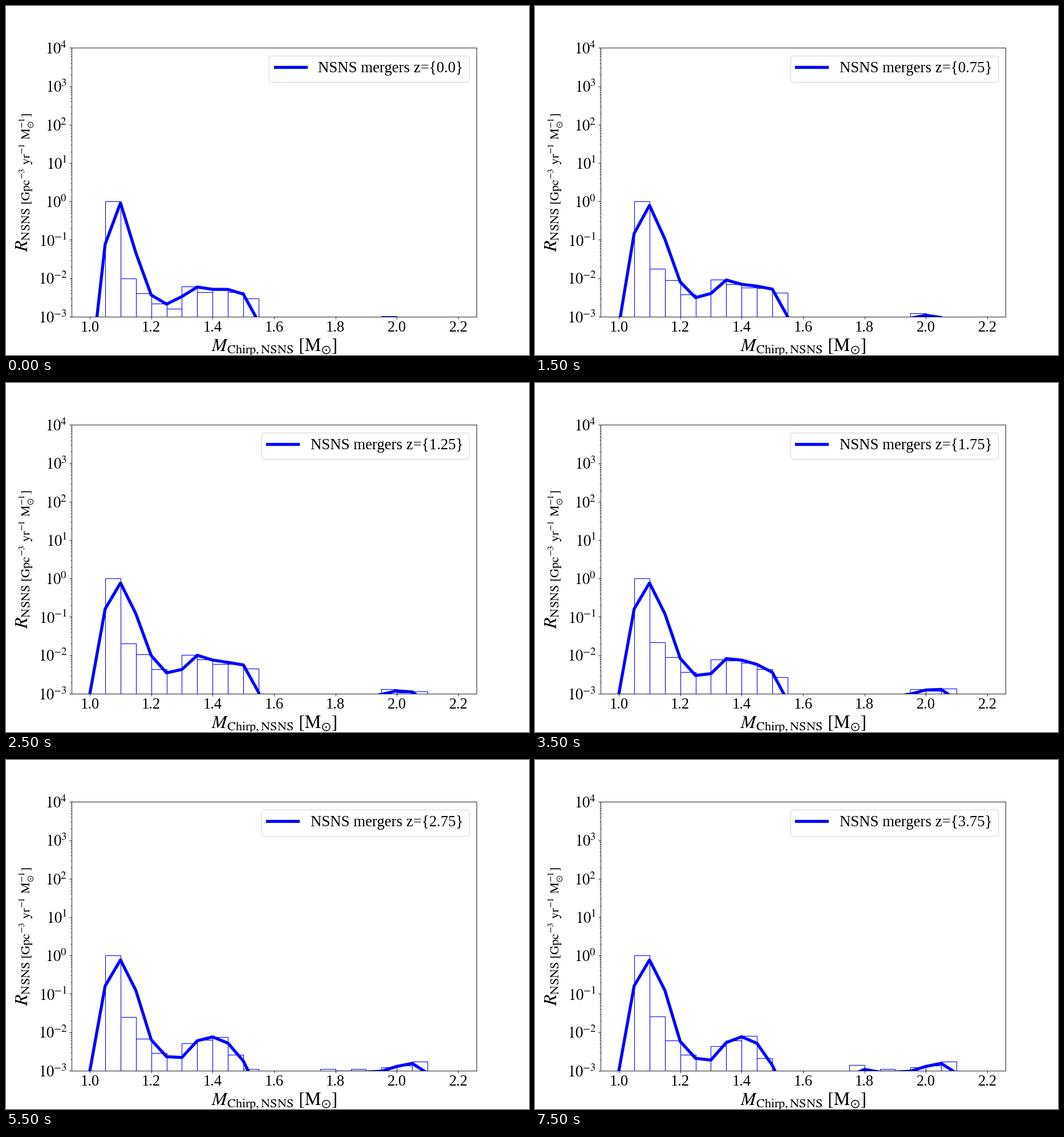
A matplotlib script for the animation above (8000 ms loop, 917 by 611 pixels).

```python
import numpy as np
import matplotlib.pyplot as plt
from matplotlib.animation import FuncAnimation
from matplotlib.ticker import FuncFormatter, LogLocator, MultipleLocator, NullFormatter

W, H, DPI = 917, 611, 64
PT = W / 12 / DPI          # sizes below are for a 12 inch wide figure
FRAMES, STEP = 16, 0.25
Z_MID, Z_END = 1.25, 3.75

plt.rcParams.update({
    "font.family": "Liberation Serif",
    "mathtext.fontset": "stix",
    "font.size": 25 * PT,
    "axes.linewidth": 0.8 * PT,
    "axes.labelpad": 4 * PT,
    "patch.linewidth": 1.0 * PT,
})
for axis in ("xtick", "ytick"):
    plt.rcParams.update({
        f"{axis}.major.size": 3.5 * PT, f"{axis}.major.width": 0.8 * PT,
        f"{axis}.minor.size": 2 * PT, f"{axis}.minor.width": 0.6 * PT,
        f"{axis}.major.pad": 3.5 * PT,
    })

BIN = 0.05
NODES = 1.0 + BIN * np.arange(23)
EDGES = NODES[1:-1]

# Rates are in units of 1e-3; light bins at redshift 0, Z_MID and Z_END
LIGHT = np.log([
    [10, 4.0, 2.2, 1.6, 6.2, 4.4, 5.0, 4.3, 3.0],
    [20, 10.7, 4.3, 0.9, 10.2, 7.8, 5.8, 5.9, 4.5],
    [26, 6.1, 2.6, 0.5, 4.3, 6.0, 8.0, 2.1, 0.8],
])

# Share of each bin that goes to the node on its right
SHARE = np.where(EDGES < 1.6, 0.78 - 3.4 * (EDGES - 1.1) ** 2, 0.5)


def ease_out(t):
    return np.sin(np.pi / 2 * np.clip(t, 0, 1))


def light(z):
    k = int(z >= Z_MID)
    t = (z - Z_MID) / (Z_END - Z_MID) if k else z / Z_MID
    return np.exp(LIGHT[k] + (LIGHT[k + 1] - LIGHT[k]) * ease_out(t))


def heavy(z):
    """Rippled plateau with a broad bump that grows and drifts right."""
    grow = min(z / 2.5, 1)
    x = EDGES[-7:] + BIN / 2
    ripple = 1 + 0.2 * (-1.0) ** np.arange(7)
    bump = np.exp(-((x - 1.99 - 0.055 * grow) / 0.06) ** 4)
    rate = (0.65 + 0.265 * grow) * ripple + (0.25 + 0.4 * grow) * bump
    rate[0] = 0.22 + 0.32 * z
    return rate


def histogram(z):
    return np.concatenate([[1000], light(z), np.full(4, 0.01), heavy(z)])


def curve(z):
    """Gaussian main peak plus the other bins shared between their edges."""
    e = ease_out(z / Z_MID)
    sigma = 0.021 + 0.0055 * e
    y = (920 - 155 * e) * np.exp(-0.5 * ((NODES - 1.0968) / sigma) ** 2)
    rest = histogram(z)
    rest[0] = 0
    y[1:-1] += (1 - SHARE) * rest
    y[2:] += SHARE * rest
    return y


def label(z):
    return f"NSNS mergers z={{{z}}}"


fig = plt.figure(figsize=(W / DPI, H / DPI), dpi=DPI, facecolor="white")
ax = fig.add_axes([0.125, 0.11, 0.775, 0.77])
ax.set_yscale("log")

bars = ax.bar(EDGES, 1e-3 * histogram(0), width=BIN, bottom=1e-9, align="edge",
              fill=False, edgecolor="blue", linewidth=1.0 * PT)
line, = ax.plot(NODES, 1e-3 * curve(0), color="blue", linewidth=5 * PT,
                label=label(0.0))

ax.set_xlim(0.94, 2.26)
ax.set_ylim(1e-3, 1e4)
ax.xaxis.set_major_locator(MultipleLocator(0.2))
ax.yaxis.set_major_locator(LogLocator(numticks=20))
ax.yaxis.set_minor_locator(LogLocator(subs=range(2, 10), numticks=20))
ax.yaxis.set_major_formatter(FuncFormatter(
    lambda v, _: rf"$\mathrm{{10^{{{round(np.log10(v))}}}}}$"))
ax.yaxis.set_minor_formatter(NullFormatter())
ax.set_xlabel(r"$M_{\mathrm{Chirp, NSNS}}\ \mathrm{[M_{\odot}]}$", fontsize=30 * PT)
ax.set_ylabel(r"$R_{\mathrm{NSNS\ [Gpc^{-3}\ yr^{-1}\ M_{\odot}^{-1}]}}$",
              fontsize=30 * PT)
legend = ax.legend(loc="upper right", fontsize=25.3 * PT)


def update(i):
    z = i * STEP
    for bar, h in zip(bars, 1e-3 * histogram(z)):
        bar.set_height(h)
    line.set_ydata(1e-3 * curve(z))
    legend.get_texts()[0].set_text(label(z))
    return [*bars, line, legend]


anim = FuncAnimation(fig, update, frames=FRAMES, interval=500, repeat=True,
                     repeat_delay=0, blit=False)
plt.show()
```
